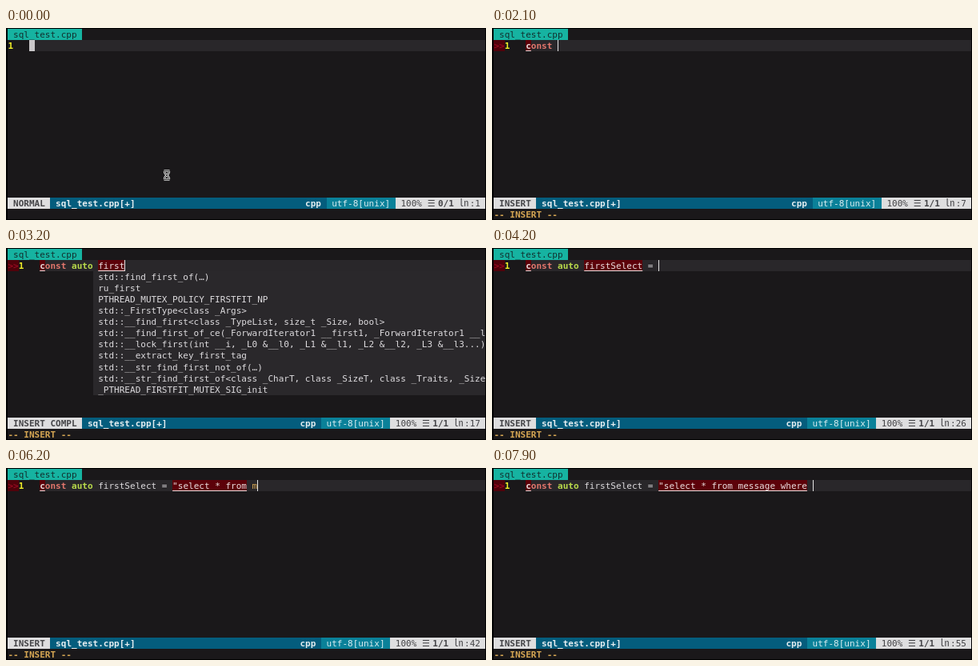
Write an HTML page with a canvas that moves like this. It is 600 by 240 pixels and loops after 8000 ms.

```html
<!DOCTYPE html>
<html lang="en">
<head>
<meta charset="utf-8">
<title>Editor completion</title>
<style>
html, body { margin: 0; width: 100%; height: 100%; overflow: hidden; background: #000; }
canvas { display: block; }
</style>
</head>
<body>
<canvas id="stage" width="600" height="240"></canvas>
<script>
const ctx = document.getElementById('stage').getContext('2d');
const LOOP = 8000, CW = 6.636, RH = 14.07, X0 = 2.4, Y0 = 1;
const MONO = '"DejaVu Sans Mono", monospace';
const C = {
  bg: '#1a181a', line: '#29272a', menu: '#2a282b', fg: '#dedcdf',
  teal: '#16b3a1', blue: '#045d7d', cyan: '#0a8199', light: '#dededf', ink: '#444447',
  bad: '#5c0109', badText: '#eadfdf', rule: '#f2dede', tan: '#d5a653',
  salmon: '#e2766c', green: '#b9db4b', yellow: '#f2ef27'
};

const LINE = 'const auto firstSelect = "select * from message where ';
const NAME = 11, STRING = 25;

// Moments at which the typed length changes: [ms, length]
const KEYS = [
  [0, 0], [1600, 1], [1700, 2], [1800, 3], [1900, 4], [2000, 5], [2100, 6], [2200, 8],
  [2300, 9], [2400, 10], [2500, 11], [2800, 12], [2900, 13], [3000, 14], [3100, 16],
  [3500, 17], [3600, 18], [3700, 19], [3800, 20], [3900, 21], [4000, 22], [4100, 24], [4200, 25]
];

const MENUS = [
  { start: 0, end: 5, right: 90, items: [
    'const', 'constexpr', 'copysign(…)', 'cos(…)', 'cosh(…)',
    'copysignf(float, float)', 'copysignl(long double, long double)',
    'cosf(float)', 'coshf(float)', 'coshl(long double)', 'cosl(long double)',
    'std::codecvt<class _InternT, class _ExternT, class _StateT>',
    'std::codecvt_base',
    'std::codecvt_byname<class _InternT, class _ExternT, class _StateT>'
  ] },
  { start: 6, end: 10, right: 61, kinds: 'kiiiiiiicst', items: [
    'auto', 'std::aligned_union_t<size_t _Len, class _Types>',
    'std::atomic_uint16_t', 'std::atomic_uint32_t', 'std::atomic_uint64_t',
    'std::atomic_uint8_t', 'std::atomic_uintmax_t', 'std::atomic_uintptr_t',
    'std::auto_ptr<class _Tp>', 'std::auto_ptr_ref<class _Tp>',
    '_LIBCPP_TYPE_INFO_VTABLE_POINTER_AUTH'
  ] },
  { start: NAME, end: 16, right: 90, items: [
    'std::find_first_of(…)', 'ru_first', 'PTHREAD_MUTEX_POLICY_FIRSTFIT_NP',
    'std::_FirstType<class _Args>',
    'std::__find_first<class _TypeList, size_t _Size, bool>',
    'std::__find_first_of_ce(_ForwardIterator1 __first1, _ForwardIterator1 __last1',
    'std::__lock_first(int __i, _L0 &__l0, _L1 &__l1, _L2 &__l2, _L3 &__l3...)',
    'std::__extract_key_first_tag', 'std::__str_find_first_not_of(…)',
    'std::__str_find_first_of<class _CharT, class _SizeT, class _Traits, _SizeT',
    '_PTHREAD_FIRSTFIT_MUTEX_SIG_init'
  ] }
];

const colX = c => X0 + c * CW;
const rowY = r => Y0 + r * RH;

function fill(x, y, w, h, color) {
  ctx.fillStyle = color;
  ctx.fillRect(x, y, w, h);
}

function cells(col, row, count, color) {
  const x = Math.round(colX(col)), y = Math.round(rowY(row));
  const right = Math.min(599, Math.round(colX(col + count)));
  fill(x, y, right - x, Math.round(rowY(row + 1)) - y, color);
}

function put(text, col, row, color = C.fg, bold = false, font = MONO, size = 11.02) {
  ctx.font = `${bold ? 'bold ' : ''}${size}px ${font}`;
  ctx.fillStyle = color;
  ctx.fillText(text, colX(col), rowY(row) + 10.8);
}

function typed(t) {
  if (t < 4600) return KEYS.findLast(k => k[0] <= t)[1];
  const step = Math.floor(t / 100) * 100;
  if (step <= 6200) return 25 + Math.ceil((step - 4600) / 1600 * 15 + 0.01);
  return 41 + Math.floor((step - 6200) / 1700 * 13);
}

function matches(item, word) {
  let i = 0;
  for (const ch of item.toLowerCase()) if (ch === word[i]) i++;
  return i >= word.length;
}

function drawTab() {
  cells(0, 0, 14, C.teal);
  put('sql_test.cpp', 1, 0, '#12302f');
}

function flag(from, to, left) {
  const text = LINE.slice(from, to).trimEnd();
  if (!text) return;
  cells(left + from, 1, text.length, C.bad);
  put(text, left + from, 1, C.badText, from === 0);
  fill(colX(left + from), 28, text.length * CW, 1, C.rule);
}

function drawCode(t, n) {
  const sign = t >= 2100, left = sign ? 6 : 4;
  cells(left, 1, 90 - left, C.line);
  if (sign) {
    cells(0, 1, 2, '#50020b');
    put('>>', 0, 1, '#a90d25');
  }
  put('1', sign ? 2 : 0, 1, C.yellow, true);

  const part = (from, to, color, bold) =>
    put(LINE.slice(from, Math.min(n, to)), left + from, 1, color, bold);
  if (n > 0) part(0, 5, n < 5 ? C.fg : C.salmon, n >= 5);
  if (n > 6) part(6, 10, n < 10 ? C.fg : C.green, n >= 10);
  if (n > NAME) part(NAME, STRING, C.fg);
  if (n > STRING) part(STRING, LINE.length, C.tan);

  // Diagnostics trail the typing by a tenth of a second.
  if (sign) {
    const seen = typed(t - 100);
    flag(0, 1, left);
    if (n > STRING) flag(STRING, seen, left);
    else if (n > NAME) flag(NAME, Math.min(seen, 22), left);
    else if (n < 10) flag(6, seen, left);
  }

  const x = Math.round(colX(left + n));
  if (t >= 900) fill(x, 15, 1, 14, '#e4e4e4');
  else if (t < 100 || t >= 500) fill(x, 15, 7, 14, '#c9c7c9');
}

function drawStatus(t, n, menuOpen) {
  const mode = t < 900 ? ' NORMAL ' : menuOpen ? ' INSERT COMPL ' : ' INSERT ';
  const place = ':' + (n + 1);
  const right = 90 - 15 - place.length;
  cells(0, 15, 90, C.blue);
  cells(0, 15, mode.length, C.light);
  put(mode, 0, 15, C.ink, true);
  put('sql_test.cpp[+]', mode.length + 1, 15, '#e6eef1', true);
  put('cpp', right - 17, 15, '#e6eef1', true);
  cells(right - 13, 15, 13, C.cyan);
  put('utf-8[unix]', right - 12, 15, '#d9edf0');
  cells(right, 15, 90 - right, C.light);
  put('100%', right + 1, 15, C.ink);
  put('☰', right + 6, 15, C.ink, false, '"DejaVu Sans", sans-serif');
  put(n ? '1/1' : '0/1', right + 8, 15, C.ink, true);
  put('㏑', right + 12, 15, C.ink, false, '"Noto Sans CJK SC", "Noto Sans CJK JP", "Noto Sans CJK", sans-serif', 12);
  put(place, right + 14, 15, C.ink);
  if (t >= 900) put('-- INSERT --', 0, 16, C.tan, true);
}

function drawMenu(menu, rows) {
  const left = menu.start + (menu.start ? 6 : 4);
  rows.forEach((i, k) => {
    const row = k + 2;
    cells(left - 1, row, menu.right - left + 1, C.menu);
    put(menu.items[i], left, row);
    if (menu.kinds) put(menu.kinds[i], 60, row);
  });
  if (rows.length === 14) {
    fill(592, 29, 7, 70, '#f4f4f4');
    fill(592, 99, 7, 127, '#717073');
  }
}

function drawPointer() {
  const shape = new Path2D('M197.5 178.5h7M197.5 189.5h7M198 179q0 3 3 5q3-2 3-5M198 189q0-3 3-5q3 2 3 5');
  ctx.strokeStyle = '#dddddd';
  ctx.lineWidth = 2.4;
  ctx.stroke(shape);
  ctx.strokeStyle = '#202020';
  ctx.lineWidth = 0.8;
  ctx.stroke(shape);
}

function draw(t) {
  const n = typed(t);
  const menu = MENUS.find(m => n >= m.start + 2 && n <= m.end);
  const word = menu ? LINE.slice(menu.start, n) : '';
  const rows = menu ? [...menu.items.keys()].filter(i => matches(menu.items[i], word)) : [];

  fill(0, 0, 600, 240, '#000');
  ctx.save();
  ctx.beginPath();
  ctx.rect(2, 1, 597, 238);
  ctx.clip();
  fill(2, 1, 597, 238, C.bg);
  drawTab();
  drawCode(t, n);
  drawStatus(t, n, rows.length > 0);
  if (rows.length) drawMenu(menu, rows);
  if (t < 1600) drawPointer();
  ctx.restore();
}

const begin = performance.now();
function tick() {
  draw((performance.now() - begin) % LOOP);
  requestAnimationFrame(tick);
}
tick();
</script>
</body>
</html>
```
